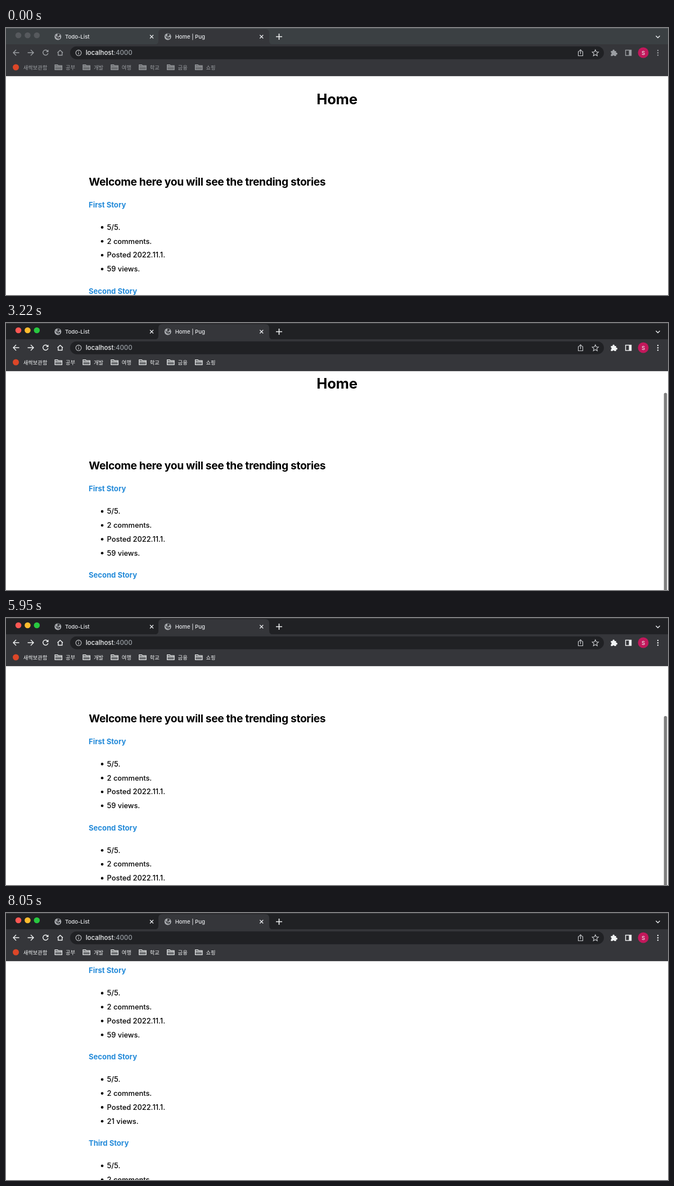
Write an HTML page that moves like this. It is 1177 by 476 pixels and loops after 8890 ms.

```html
<!DOCTYPE html>
<html lang="en">
<head>
<meta charset="utf-8">
<title>Story pages</title>
<style>
html, body { margin: 0; width: 100%; height: 100%; overflow: hidden; background: #fff; }
svg { display: block; width: 1177px; height: 476px; }
text { font-family: Inter, "Noto Sans CJK KR", "Noto Sans CJK", sans-serif; font-weight: 450; font-optical-sizing: none; white-space: pre; }
.h1 { font-size: 25.6px; font-weight: 700; letter-spacing: -.25px; text-anchor: middle; }
.h2 { font-size: 19.2px; font-weight: 700; letter-spacing: -.33px; }
.body { font-size: 12.85px; }
.link { font-size: 13.05px; font-weight: 700; fill: #238ad9; }
.link.hover { fill: #36a5e6; text-decoration: underline; }
.tab { font-size: 9.55px; fill: #e8eaed; }
.url { font-size: 11.45px; fill: #f1f3f4; }
.mark { font-size: 9.3px; font-weight: 500; fill: var(--ink); }
.line { fill: none; stroke: var(--ink); stroke-width: 1.4; }
.solid { fill: var(--ink); }
.soft { fill: none; stroke: #c8cacd; stroke-width: 1.1; }
#ui { --ink: #f1f3f4; --frame: #202124; }
#ui.blur { --ink: #9b9ea2; --frame: #3b4043; }
#ui.blur .light { fill: #56595d; }
</style>
</head>
<body>
<svg id="stage" viewBox="0 0 1177 476" xmlns="http://www.w3.org/2000/svg"></svg>
<script>
const LOOP = 8890;
const stories = ['First', 'Second', 'Third'];

const text = (cls, x, y, content, extra = '') =>
  `<text class="${cls}" x="${x}" y="${y}" ${extra}>${content}</text>`;
const path = (cls, d, extra = '') => `<path class="${cls}" d="${d}" ${extra}/>`;
const circle = (x, y, r, extra = '') => `<circle cx="${x}" cy="${y}" r="${r}" ${extra}/>`;

function storyBlock(name, index) {
  const top = 319.8 + index * 153.9;
  const items = ['5/5.', '2 comments.', 'Posted 2022.11.1.', `${index ? 21 : 59} views.`];
  return text('link', 147, top, `${name} Story`) + items.map((item, i) => {
    const y = top + 39.9 + i * 24.8;
    return circle(171, y - 4.3, 2.3) + text('body', 179.6, y, item);
  }).join('');
}

const homePage = `<g id="home">
  ${text('h1', 588.5, 136.4, 'Home')}
  ${text('h2', 147.3, 280.9, 'Welcome here you will see the trending stories')}
  ${stories.map(storyBlock).join('')}
</g>`;

const watchPage = `<g id="watch">
  ${text('h1', 588.5, 172.4, '', 'id="heading"')}
  ${text('h2', 147.3, 317, 'watchstory.pug')}
  ${text('body', 147.3, 433.2, '© 2022 Pug')}
</g>`;

const backOverlay = `<g id="arrow">
  ${circle(-4, 369, 61.3, 'fill="#ababab"')}
  <g fill="none" stroke-linecap="round" stroke-linejoin="round">
    ${['stroke="#8f8f8f" stroke-width="8.6"', 'stroke="#fff" stroke-width="7.4"'].map(style =>
      path('', 'M28 355.5L15 368.7L28 382M15 368.7H43', style)).join('')}
  </g>
</g>`;

const globe = x => circle(x, 15.5, 6, 'fill="#a8abaf"') +
  path('', `M${x - 5} 13l3 2.5 2 .5v3.5l-2-1.5zM${x - 1} 10l3 .5 2 2-2 1-1.5 2-2-1 1-2zM${x + 1} 16h3l-1 3-2 1z`, 'fill="#35363a"');
const cross = x => path('', `M${x - 3} 12.5l6 6m0-6l-6 6`, 'stroke="#e8eaed" stroke-width="1.3"');
const folder = (label, i) => {
  const x = 87 + i * 49.9;
  return path('line', `M${x} 74.5v-9h4.5l1.5 1.5h6.5v7.5zM${x} 69h12.5`, 'style="stroke-width:1.1;fill:#6c6e71"') +
    text('mark', x + 19, 73.5, label);
};

const lights = ['#fc5753', '#fdbc2e', '#28c840']
  .map((color, i) => circle(22 + i * 16.4, 13, 5.3, `class="light" fill="${color}"`)).join('');

const browserBar = `<g id="ui">
  <rect width="1177" height="30" fill="var(--frame)"/>
  <rect width="1177" height="1" fill="#fff" opacity=".14"/>
  <rect y="29" width="1177" height="57" fill="#35363a"/>
  <rect y="85" width="1177" height="1" fill="#505256"/>
  ${path('', 'M264 29.5q7 0 7-7V9q0-7 7-7H461q7 0 7 7v13.5q0 7 7 7z', 'fill="#35363a"')}
  ${lights}
  ${globe(92.3)}${text('tab', 105, 19, 'Todo-List')}${cross(259)}
  ${globe(287.7)}${text('tab', 300.7, 19, '', 'id="title"')}${cross(454.3)}
  ${path('', 'M480 15.5h11m-5.5-5.5v11', 'stroke="#f1f3f4" stroke-width="1.6"')}
  ${path('', 'M1155.5 14l3.5 3.5 3.5-3.5', 'fill="none" stroke="#e8eaed" stroke-width="1.5"')}

  ${path('line', 'M23.5 44H13M18 39l-5 5 5 5')}
  ${path('line', 'M38.5 44H49M44 39l5 5-5 5', 'id="forward"')}
  ${path('line', 'M74 41a4.6 4.6 0 1 0 .8 4')}${path('solid', 'M75.5 38.5v4.5h-4.5z')}
  ${path('line', 'M91.5 44l4.8-4.3 4.8 4.3M92.8 43v5.5h7v-5.5')}
  <rect x="114" y="32.7" width="949" height="23" rx="11.5" fill="#202124"/>
  ${circle(129, 44.3, 4.9, 'class="soft"')}${path('soft', 'M129 43.5v3.5M129 41v1.3')}
  <text class="url" x="141.7" y="48.2">localhost<tspan id="route" fill="#9aa0a6"></tspan></text>
  ${path('soft', 'M1019.5 42h-2v7.5h8V42h-2M1021.5 46.5v-7.5M1019 41.2l2.5-2.5 2.5 2.5')}
  ${path('soft', 'M1047.8 38.8l1.6 3.7 4 .4-3 2.7.9 4-3.5-2.1-3.5 2.1.9-4-3-2.7 4-.4z')}
  ${path('solid', 'M1075.5 41h3a1.8 1.8 0 1 1 3.4 0h2.8v3a1.8 1.8 0 1 1 0 3.4v2.6h-3a1.7 1.7 0 0 0-3.3 0h-2.9v-3a1.7 1.7 0 0 0 0-3.3z')}
  <rect class="line" x="1101.6" y="39.5" width="10" height="9.5"/><rect class="solid" x="1107.5" y="39.5" width="4" height="9.5"/>
  ${circle(1133, 44, 9.5, 'fill="#c2185b"')}
  ${text('tab', 1133, 47.5, 'S', 'text-anchor="middle"')}
  ${[40, 44.2, 48.4].map(y => circle(1159, y, 1.2, 'class="solid"')).join('')}

  ${circle(17.5, 70, 5.5, 'fill="#dc4628"')}
  ${text('mark', 30.7, 73.5, '새싹보관함')}
  ${['공부', '개발', '여행', '학교', '금융', '쇼핑'].map(folder).join('')}
</g>`;

const stage = document.getElementById('stage');
stage.innerHTML = homePage + watchPage +
  '<rect id="bar" x="1169.7" width="5.6" height="500" rx="2.8" fill="#7e7e7e"/>' +
  backOverlay + browserBar;
const el = id => document.getElementById(id);
const links = [...stage.querySelectorAll('.link')];

// nav and page: 0 is home, 1 to 3 a story; hover: the story pointed at, 0 for none.
const start = { focus: false, forward: true, nav: 0, page: 0, scroll: 0, bar: false, hover: 0, arrow: 0 };
const scrollRun = (time, ...offsets) =>
  offsets.map((scroll, i) => [time + i * 70, { scroll, bar: true, hover: 0 }]);
const openStory = (time, story) => [
  [time, { nav: story, forward: false }],
  [time + 70, { page: story, bar: false, hover: 0 }],
];
const goBack = time => [
  [time, { arrow: 1 }],
  [time + 70, { nav: 0, forward: true, arrow: .5 }],
  [time + 140, { page: 0, arrow: 0 }],
];

const steps = [
  [0, {}],
  [1120, { focus: true }],
  [1260, { hover: 1 }],
  ...openStory(1750, 1),
  ...goBack(2520),
  ...scrollRun(3150, 4, 19.5, 56, 81, 90.8),
  [3710, { hover: 2 }],
  ...openStory(4060, 2),
  ...goBack(5250),
  [5740, { hover: 2 }],
  ...scrollRun(5950, 95, 116, 152, 184, 205, 212.5),
  [6510, { hover: 3 }],
  ...openStory(6790, 3),
  [7840, { arrow: .6 }],
  ...goBack(7910),
];
let state = start;
const timeline = steps.map(([time, change]) => [time, state = { ...state, ...change }]);

function show(s) {
  const visible = (id, on) => el(id).style.display = on ? '' : 'none';
  const watching = n => `Watch #${stories[n - 1]} Story`;
  el('ui').setAttribute('class', s.focus ? '' : 'blur');
  el('forward').style.stroke = s.forward ? '' : '#797b7f';
  el('title').textContent = `${s.nav ? watching(s.nav) : 'Home'} | Pug`;
  el('route').textContent = ':4000' + (s.nav ? `/stories/${s.nav}` : '');
  visible('home', !s.page);
  visible('watch', s.page);
  visible('bar', s.bar);
  el('heading').textContent = s.page ? watching(s.page) : '';
  el('home').setAttribute('transform', `translate(0 ${-s.scroll})`);
  el('bar').setAttribute('y', 111.5 + s.scroll * .666);
  el('arrow').style.opacity = s.arrow;
  links.forEach((link, i) => link.classList.toggle('hover', s.hover === i + 1));
}

let shown;
function tick() {
  const time = performance.now() % LOOP;
  const current = timeline.findLast(([at]) => at <= time)[1];
  if (current !== shown) show(shown = current);
  requestAnimationFrame(tick);
}
tick();
</script>
</body>
</html>
```
